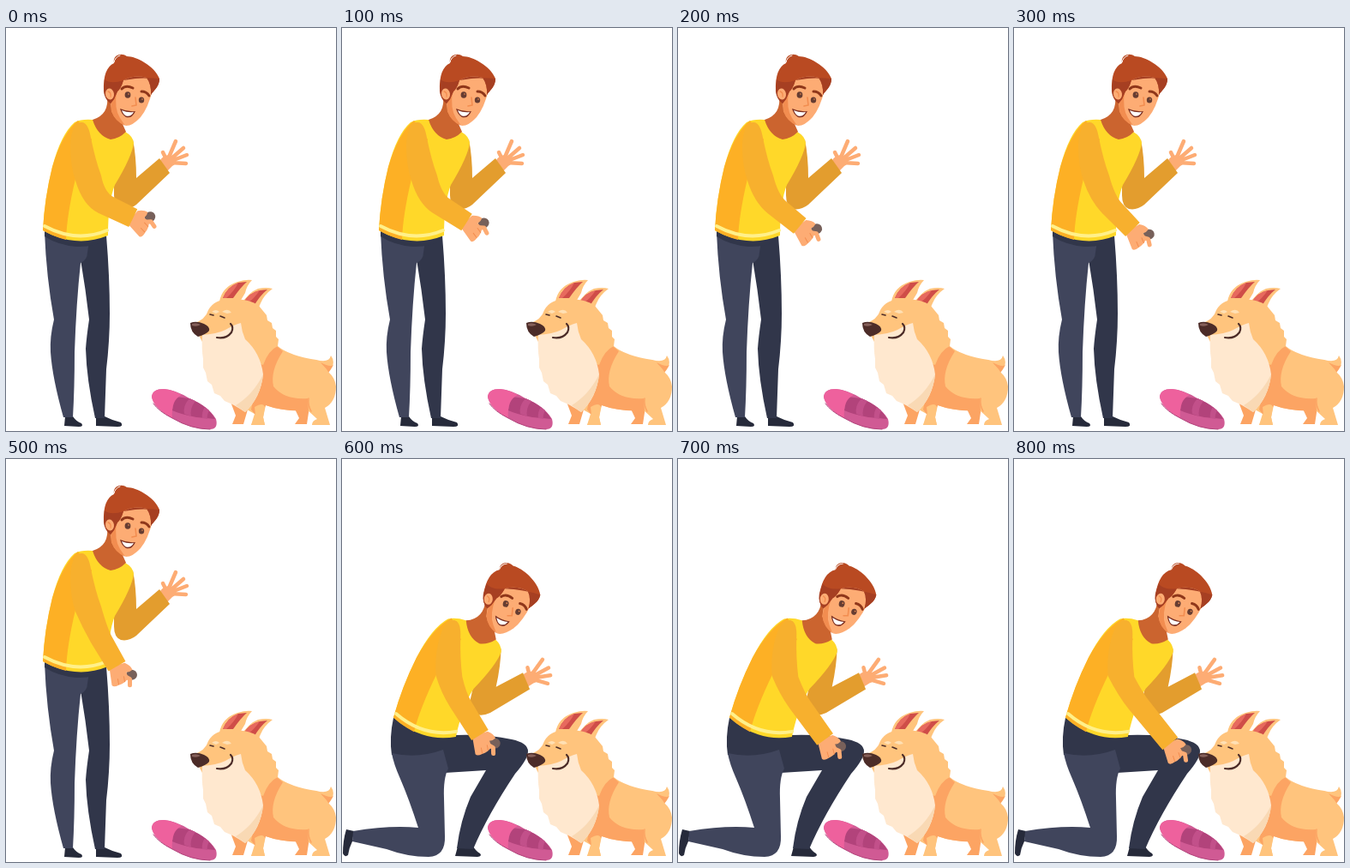
These frames come from a looping animation (385x470 px, 2.8 s). An HTML page with a canvas:

```html
<!DOCTYPE html>
<html lang="en">
<head>
<meta charset="utf-8">
<title>Man and dog</title>
<style>
html, body { margin: 0; width: 100%; height: 100%; overflow: hidden; background: #fff; }
canvas { display: block; width: 385px; height: 470px; }
</style>
</head>
<body>
<canvas id="stage"></canvas>
<script>
const W = 385, H = 470, LOOP = 2800, STEP = 100;
const canvas = document.getElementById('stage');
const ctx = canvas.getContext('2d');
const dpr = window.devicePixelRatio || 1;
canvas.width = W * dpr;
canvas.height = H * dpr;

const C = {
  yellow: '#ffd829', amber: '#fdb025', sleeve: '#f7b02e', backSleeve: '#e39d2e', stripe: '#fff08a',
  skin: '#fdac74', skinShade: '#f28d50', neck: '#cb642f', hair: '#b94a22', hairShade: '#a63f22', brow: '#8f371a',
  dark: '#31364a', pants: '#40455c', shoe: '#262a3a', ball: '#77605a',
  fur: '#ffc47d', furShade: '#fca463', cream: '#ffe8cf', creamShade: '#f9d9b4', ear: '#cf4d48', brown: '#4c2c28'
};

function fill(color, d) {
  ctx.fillStyle = color;
  ctx.fill(new Path2D(d));
}

function line(color, width, d) {
  ctx.strokeStyle = color;
  ctx.lineWidth = width;
  ctx.stroke(new Path2D(d));
}

function oval(color, x, y, rx, ry = rx, turn = 0) {
  ctx.fillStyle = color;
  ctx.beginPath();
  ctx.ellipse(x, y, rx, ry, turn, 0, Math.PI * 2);
  ctx.fill();
}

const mix = (a, b, k) => a + (b - a) * k;

function standingLegs() {
  fill(C.shoe, 'M69 453H78Q82 459 88 461Q91 465 85 465L68 464Z');
  fill(C.shoe, 'M105 453H115Q125 458 134 460Q138 465 130 465L105 464Z');
  fill(C.dark, 'M86 245L117 242Q121 290 121 333Q121 365 117 398L115 455H104Q94 410 93 374Q94 360 97 340Q93 305 87 270Z');
  fill(C.pants, 'M45 238Q47 290 56 340Q51 360 52 378Q54 408 67 454H78Q80 420 80 378Q82 320 87 274Q95 270 95 262L97 248Z');
  fill(C.dark, 'M45 237L117 240V247Q102 256 82 255Q60 253 45 243Z');
}

function kneelingLegs() {
  fill(C.shoe, 'M5 432L14 434L12 446Q8 454 7 462Q3 465 1 460Q1 445 5 432Z');
  fill(C.shoe, 'M135 452H153Q157 458 161 460Q164 463 158 464L132 463Z');
  fill(C.dark, 'M60 302Q55 325 58 345L120 366L168 363L150 394Q138 422 134 454L153 455Q170 415 202 367Q217 350 217 341Q217 331 198 327Q170 321 134 322Z');
  fill(C.pants, 'M58 343Q88 350 118 339L124 361Q118 372 119 396L120 440Q121 463 101 464Q76 464 52 455L12 446L13 434Q55 427 89 430Q78 396 68 373Q60 355 58 343Z');
}

function backArm() {
  line(C.skin, 4.5, 'M189 153L198 132M192 153L207 140M193 155L211 148M192 157L210 158M187 153L183 145');
  fill(C.skin, 'M180 154Q183 149 190 148L197 153Q199 159 194 161L188 167Z');
  fill(C.backSleeve, 'M148 130Q152 150 152 175L179 152L191 169L152 206Q143 213 134 211Q126 208 126 195V182Z');
}

function torso() {
  fill(C.yellow, 'M101 107Q118 113 139 121Q148 126 149 134Q147 150 127 183Q119 203 119 242Q99 250 80 248Q60 246 43 236Q45 198 54 162Q64 124 80 110Q88 106 101 107Z');
  fill(C.amber, 'M84 108Q66 122 54 162Q45 198 43 236Q55 243 70 247Q71 218 81 176L100 130Z');
  line(C.stripe, 4, 'M45 231Q82 251 118 236');
}

function head() {
  fill(C.neck, 'M118 78Q121 101 101 107Q107 126 122 130Q132 129 140 121L136 112L128 80Z');
  fill(C.skin, 'M124 68Q134 46 162 52L171 72Q166 93 157 104Q148 114 140 114Q128 109 123 97Q121 83 124 68Z');
  fill(C.skinShade, 'M123 80L129 74Q126 94 133 105L139 114Q127 109 123 97Z');
  fill(C.hair, 'M126 41C124 32 134 28 141 33C152 33 173 44 179 59C179 68 173 72 169 78Q170 66 164 58Q150 54 137 61Q134 71 130 74L126 83L122 88Q115 83 114 73Q113 47 126 41Z');
  fill(C.hairShade, 'M115 60Q122 66 137 61Q134 71 130 74L126 83L122 88Q115 83 114 73ZM137 61Q158 57 179 59C179 68 173 72 169 78Q170 66 164 58Q150 54 137 61Z');
  line('#fff', 1, 'M126 40Q127 34 133 32');
  oval(C.skin, 121, 77, 5, 6.5, -0.15);
  line(C.skinShade, 1.3, 'M119 74Q123 75 122 80');
  line(C.brow, 3, 'M135 71Q140 66 148 70M158 74Q164 74 167 79');
  oval('#663d32', 142, 78, 3.4, 3.8);
  oval('#663d32', 158, 84, 3.2, 3.6);
  oval(C.skinShade, 143, 77, 0.8);
  oval(C.skinShade, 159, 83, 0.8);
  line(C.skinShade, 1.6, 'M151 81L152 90L147 91');
  fill('#7b2e20', 'M133 94Q142 98 151 97Q147 106 140 104Q135 101 133 94Z');
  fill('#fff', 'M135 96Q142 99 149 98Q146 104 140 102.5Q137 101 135 96Z');
}

// Hand holding the ball, origin at the wrist
function hand() {
  oval(C.ball, 17, 10, 6.5, 6);
  fill(C.skin, 'M-9 1L9 -4Q16 -1 18 4Q15 7 11 7L13 14Q9 20 2 22Q-4 25 -6 22Z');
  line(C.skin, 5, 'M8 11L15 15V22');
  line(C.skinShade, 1, 'M1 15L2 21M8 12L9 18');
}

// Front arm from a fixed shoulder through an elbow to the wrist
function frontArm(ex, ey, wx, wy) {
  const a = Math.atan2(wy - ey, wx - ex), c = Math.cos(a), s = Math.sin(a);
  const at = (x, y, along, side) => [x + c * along + s * side, y + s * along - c * side];
  ctx.save();
  ctx.translate(wx, wy);
  ctx.rotate(a - Math.PI / 3);
  hand();
  ctx.restore();

  ctx.fillStyle = C.sleeve;
  ctx.beginPath();
  ctx.moveTo(75, 140);
  ctx.bezierCurveTo(75, 118, 82, 109, 89, 110);
  ctx.quadraticCurveTo(96, 111, 99, 128);
  ctx.quadraticCurveTo(104, 153, 111, 172);
  ctx.quadraticCurveTo(...at(ex, ey, 4, 12), ...at(ex, ey, 16, 12));
  ctx.lineTo(...at(wx, wy, 0, 11.5));
  ctx.lineTo(...at(wx, wy, 0, -11.5));
  ctx.lineTo(...at(ex, ey, 8, -12.5));
  ctx.quadraticCurveTo(...at(ex, ey, -12, -12.5), 81, 178);
  ctx.quadraticCurveTo(75, 160, 75, 140);
  ctx.fill();
}

function man(step) {
  const kneel = step >= 6;
  if (kneel) kneelingLegs(); else standingLegs();
  ctx.save();
  if (kneel) {
    ctx.translate(60, 301.5);
    ctx.rotate(0.22);
    ctx.translate(-43, -236);
  }
  backArm();
  torso();
  head();
  if (kneel) {
    const k = (step - 6) / 2;
    frontArm(mix(108, 115, k), mix(195, 196, k), mix(146, 169, k), mix(234, 239, k));
  } else {
    const a = (26 + step * 6.8) * Math.PI / 180;
    frontArm(106, 201, 106 + 47 * Math.cos(a), 201 + 47 * Math.sin(a));
  }
  ctx.restore();
}

function frisbee() {
  const rim = 'M170 430Q171 421 184 421Q198 422 214 432Q236 441 245 456Q248 468 238 468Q216 468 194 455Q172 443 170 430Z';
  fill('#d05a94', rim);
  fill('#b2437b', 'M197 430L214 432Q236 441 244 456L222 454Q202 450 194 446Z');
  fill('#c2508a', 'M214 432L221 435Q214 444 216 453L208 450Q206 441 214 432ZM232 442L237 446Q234 452 235 456L229 455Q228 448 232 442Z');
  fill('#ee619d', 'M170 430Q171 421 184 421Q195 422 205 428Q192 434 194 455Q172 443 170 430Z');
  line('#b2437b', 1, 'M172 438Q178 447 194 455Q216 468 238 468');
}

function dog() {
  // far legs and tail
  fill(C.furShade, 'M262 436L268 452L264 462H277L282 445ZM335 440L342 455L337 462H351L354 442Z');
  fill(C.fur, 'M362 387Q377 391 379 382Q386 391 376 402L366 408Z');
  fill(C.furShade, 'M367 390Q378 396 382 393L376 402Z');
  // body
  fill(C.fur, 'M298 350L317 371Q330 382 362 387Q372 394 376 401Q384 408 385 418Q385 436 372 443L378 463H357Q357 458 363 456L351 445Q325 448 303 440L300 454L302 463H286L290 450L281 445L285 400Z');
  fill(C.furShade, 'M303 360L323 377Q308 400 312 418Q325 434 352 432L353 446Q325 448 303 440L300 447L290 450L286 445Z');
  fill(C.fur, 'M290 442Q300 436 302 442L300 454L302 463H286L291 452Z');
  line(C.furShade, 1.5, 'M353 432Q352 440 356 447');
  // ears
  fill(C.fur, 'M249 319Q252 302 270 296Q280 293 287 294Q281 300 279 309L270 324ZM273 324Q283 308 294 304Q304 302 311 304Q301 311 297 321L292 332Z');
  fill(C.ear, 'M253 315Q258 302 271 297L281 296Q274 302 265 315ZM277 320Q285 308 296 306L305 305Q296 312 288 326Z');
  fill('#e76a5e', 'M253 315Q258 302 271 297Q267 306 257 315ZM277 320Q285 308 296 306Q290 315 281 322Z');
  // head and ruff
  fill(C.fur, 'M218 345Q233 340 236 329Q243 316 263 316Q285 316 295 324L304 335L305 341L310 344L311 350L315 353L315 360L318 363L317 371Q306 376 300 393L230 368Z');
  fill(C.cream, 'M228 358Q246 357 256 352Q266 346 274 344Q275 354 279 363Q297 379 300 404Q297 431 279 448Q273 444 266 440L262 438L255 435L250 429L243 426L240 416L235 412L233 402L230 396L230 386Q228 374 229 358Z');
  fill(C.creamShade, 'M300 404Q297 431 279 448L268 440Q288 428 300 404Z');
  fill('#ffe0b4', 'M240 331Q245 327 249 331L245 333ZM252 331Q259 326 263 332L258 333Z');
  line(C.brown, 1.6, 'M238 334L242 335M250 336L255 338');
  line(C.brown, 2.2, 'M246 361Q257 363 263 355Q266 349 262 345');
  fill(C.brown, 'M215 344Q222 341 231 345Q238 348 237 353Q234 357 224 360Q215 355 215 344Z');
  fill('#85605a', 'M217 345Q222 343 227 346Q222 349 217 347Z');
}

function draw(now) {
  const step = Math.min(8, Math.floor((now % LOOP) / STEP));
  ctx.setTransform(dpr, 0, 0, dpr, 0, 0);
  ctx.lineCap = ctx.lineJoin = 'round';
  ctx.fillStyle = '#fff';
  ctx.fillRect(0, 0, W, H);
  man(step);
  frisbee();
  dog();
}

const start = performance.now();
function tick() {
  draw(performance.now() - start);
  requestAnimationFrame(tick);
}
tick();
</script>
</body>
</html>
```
